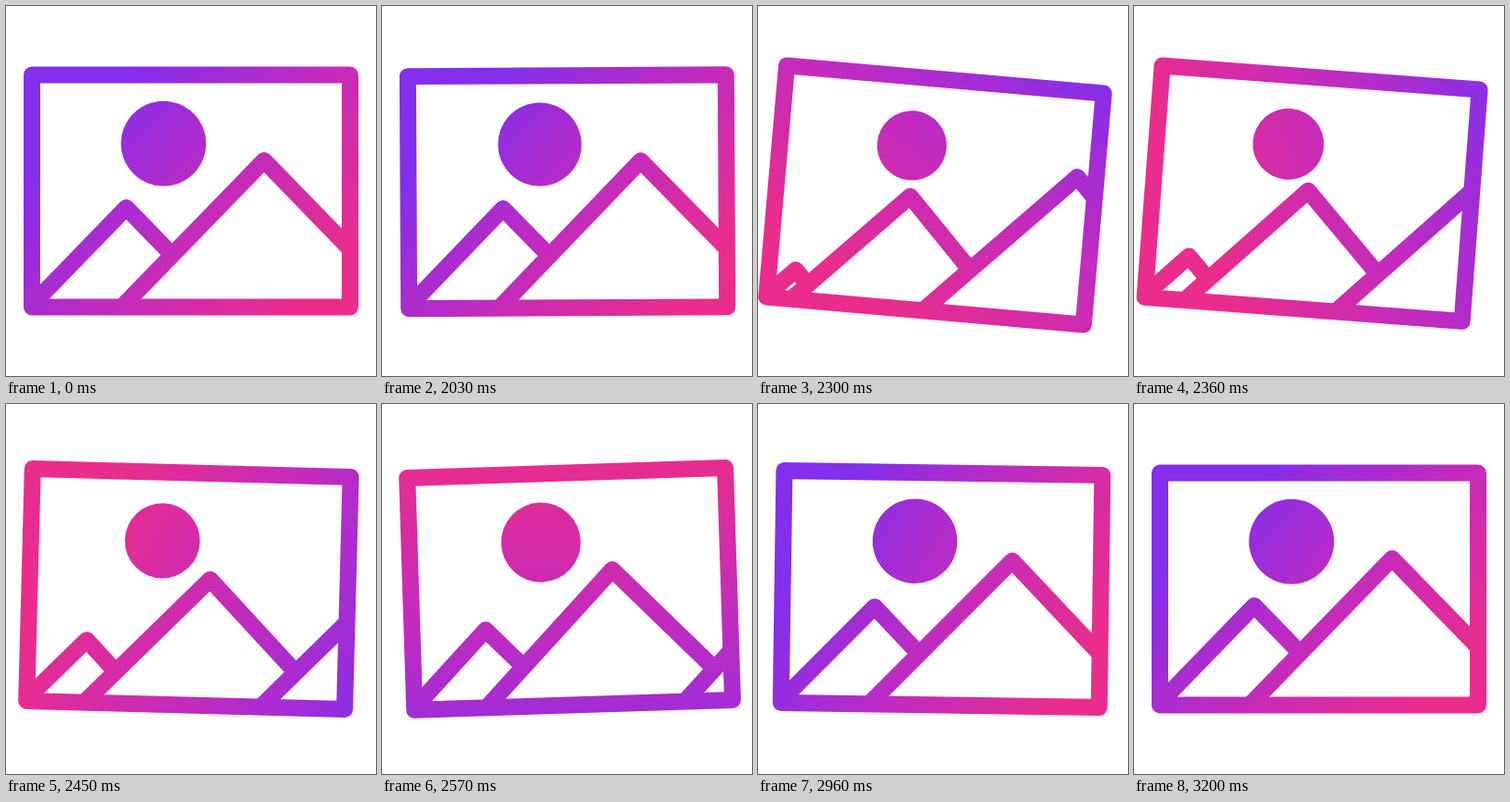
Write an HTML page with a canvas that moves like this. It is 400 px wide and 400 px high and loops after 3230 ms.

```html
<!DOCTYPE html>
<html lang="en">
<head>
<meta charset="utf-8">
<title>Swinging picture</title>
<style>
  html, body { margin: 0; width: 100%; height: 100%; overflow: hidden; background: #fff; }
  canvas { display: block; width: 400px; height: 400px; }
</style>
</head>
<body>
<canvas id="stage" width="400" height="400"></canvas>
<script>
const ctx = document.getElementById('stage').getContext('2d');
const LOOP = 3230, REST = 2000, STEP = 30, STEPS = 40;
const FRAME = [28, 74.5, 344, 251];
const SLOPE = 1.03;
const PIVOT = { x: 200, y: 102 };
const CORNER = { x: 27, y: 324.5 }, SMALL = { x: 130, y: 218 }, LARGE = { x: 279, y: 167 };
const SWING = [[0, 0], [4, -2.05], [10, 5], [20, -2], [29, 1], [40, 0]];

const clamp = (v, lo, hi) => Math.min(hi, Math.max(lo, v));
const mix = (a, b, p) => a + (b - a) * p;
const sine = p => 0.5 - 0.5 * Math.cos(Math.PI * p);

// Cubic bezier easing with handles (x1, 0) and (x2, 1)
function bezier(x1, x2, p) {
  p = clamp(p, 0, 1);
  let lo = 0, hi = 1;
  for (let i = 0; i < 30; i++) {
    const s = (lo + hi) / 2, r = 1 - s;
    if (3 * r * r * s * x1 + 3 * r * s * s * x2 + s * s * s < p) lo = s; else hi = s;
  }
  return lo * lo * (3 - 2 * lo);
}

const glide = p => bezier(0.385, 0.14, p);
const climb = p => bezier(0.33, 0.25, p);

function keyed(keys, n) {
  for (let i = 1; i < keys.length; i++) {
    const [n0, a] = keys[i - 1], [n1, b] = keys[i];
    if (n <= n1) return mix(a, b, sine((n - n0) / (n1 - n0)));
  }
  return keys[keys.length - 1][1];
}

// One full turn; the purple end reaches further out midway
function makeGradient(n) {
  const turn = bezier(0.33, 0.4, n / STEPS);
  const angle = (43 + 360 * turn) * Math.PI / 180;
  const reach = 150 + 80 * Math.sin(Math.PI * turn);
  const dx = Math.cos(angle), dy = Math.sin(angle);
  const g = ctx.createLinearGradient(
    225 - reach * dx, 200 - reach * dy, 225 + 150 * dx, 200 + 150 * dy);
  g.addColorStop(0, '#852eeb');
  g.addColorStop(0.5, '#c22bbe');
  g.addColorStop(1, '#ea2d8c');
  return g;
}

// The right flank stops at the left flank of the next mountain
function mountain(peak, next) {
  const endX = next
    ? (peak.x + next.x) / 2 + (next.y - peak.y) / (2 * SLOPE)
    : peak.x + 250;
  ctx.beginPath();
  ctx.moveTo(peak.x - 250, peak.y + 250 * SLOPE);
  ctx.lineTo(peak.x, peak.y);
  ctx.lineTo(endX, peak.y + (endX - peak.x) * SLOPE);
  ctx.stroke();
}

function mountains(n) {
  const p = glide(n / STEPS);
  const leaving = { x: LARGE.x + 250 * p, y: LARGE.y };
  const growing = { x: mix(SMALL.x, LARGE.x, p), y: mix(SMALL.y, LARGE.y, climb(n / STEPS)) };
  const rising = { x: mix(CORNER.x, SMALL.x, p), y: mix(CORNER.y, SMALL.y, p) };
  ctx.save();
  ctx.beginPath();
  ctx.rect(...FRAME);
  ctx.clip();
  mountain(leaving, null);
  mountain(growing, leaving);
  mountain(rising, growing);
  ctx.restore();
}

function draw(n) {
  const drop = n < 15 ? 5.9 * Math.pow(Math.sin(Math.PI * n / 15), 1.3) : 0;
  const shrink = 0.195 * (n < 5 ? sine(n / 5) : 1 - glide((n - 5) / 35));

  ctx.clearRect(0, 0, 400, 400);
  ctx.save();
  ctx.translate(PIVOT.x, PIVOT.y + drop);
  ctx.rotate(keyed(SWING, n) * Math.PI / 180);
  ctx.translate(-PIVOT.x, -PIVOT.y);
  ctx.fillStyle = ctx.strokeStyle = makeGradient(n);
  ctx.lineWidth = 18;
  ctx.lineJoin = 'round';

  mountains(n % STEPS);
  ctx.strokeRect(...FRAME);
  ctx.beginPath();
  ctx.arc(170.3, 148.7, 46 * (1 - shrink), 0, 2 * Math.PI);
  ctx.fill();
  ctx.restore();
}

function tick() {
  const time = performance.now() % LOOP;
  draw(clamp(Math.floor((time - REST) / STEP), 0, STEPS));
  requestAnimationFrame(tick);
}
tick();
</script>
</body>
</html>
```
